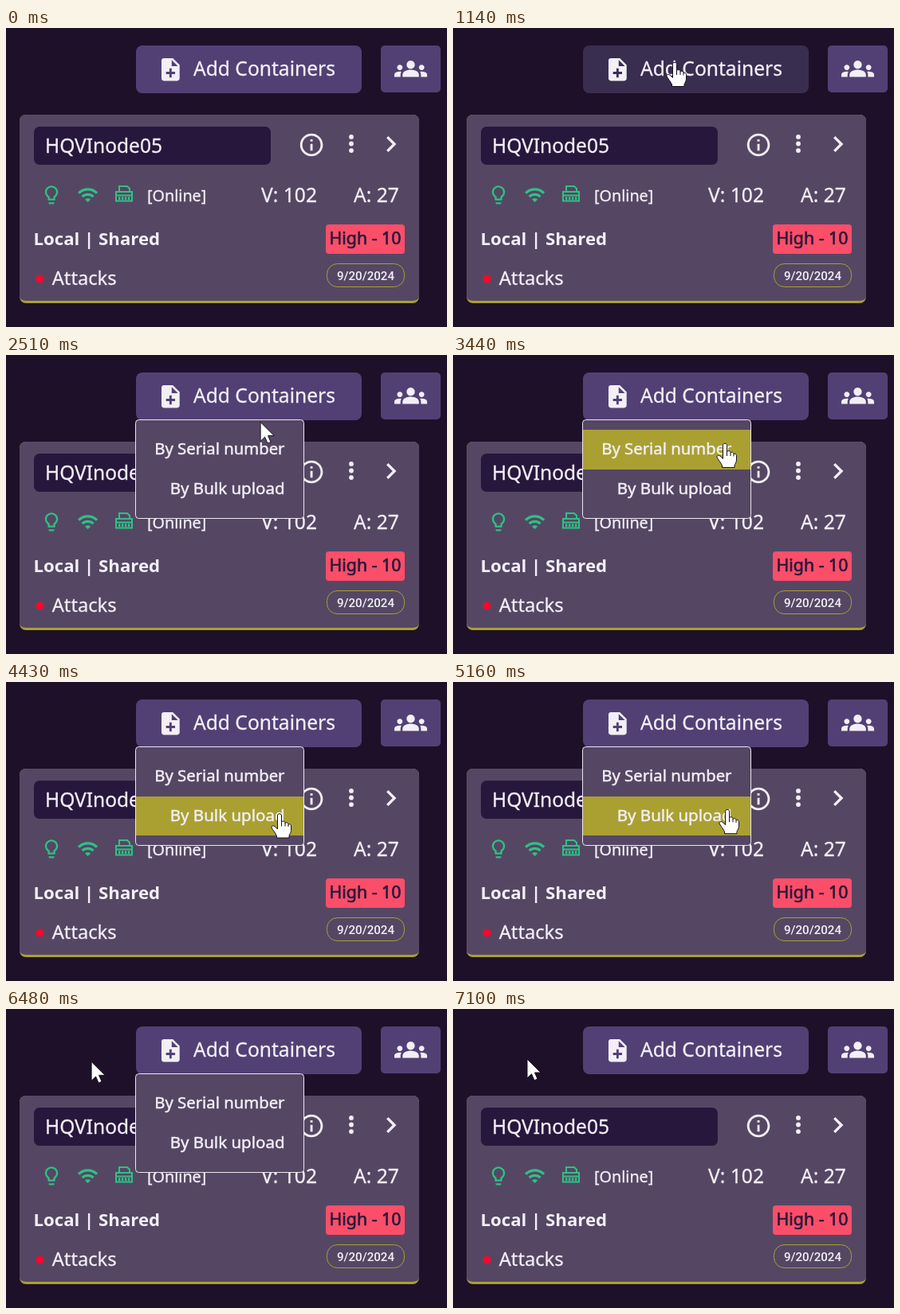
These frames come from a looping animation (553 px wide and 376 px high, 8.03 s). An HTML page:

```html
<!DOCTYPE html>
<html lang="en">
<head>
<meta charset="utf-8">
<title>Add Containers menu</title>
<style>
  html, body { margin: 0; width: 100%; height: 100%; overflow: hidden; background: #1f1029; }
  svg { display: block; width: 553px; height: 376px; font-family: "Noto Sans", "Open Sans", sans-serif; }
  text { fill: #f3eff6; stroke: #f3eff6; stroke-width: .3px; stroke-linejoin: round; white-space: pre; }
  .plain { stroke: none; }
  .dark { fill: #2a1a3c; stroke: #2a1a3c; stroke-width: .7px; }
  .medium { stroke-width: .45px; }
  .icon { fill: #f3eff6; }
  .green { fill: #2fc184; }
</style>
</head>
<body>
<svg viewBox="0 0 553 376">
  <rect width="553" height="376" fill="#1f1029"/>

  <rect id="button" x="163" y="22" width="283" height="60" rx="8"/>
  <path class="icon" transform="translate(189.3 35.2) scale(1.42)" d="M14 2H6c-1.1 0-1.99.9-1.99 2L4 20c0 1.1.89 2 1.99 2H18c1.1 0 2-.9 2-2V8l-6-6zm2 14h-3v3h-2v-3H8v-2h3v-3h2v3h3v2zm-3-7V3.5L18.5 9H13z"/>
  <text x="235" y="60" font-size="24.6">Add Containers</text>

  <rect x="470" y="22" width="75" height="59" rx="5" fill="#524075"/>
  <path class="icon" transform="translate(487 30.8) scale(1.71)" d="M12 12.75c1.63 0 3.07.39 4.24.9 1.08.48 1.76 1.56 1.76 2.73V18H6v-1.61c0-1.18.68-2.26 1.76-2.73 1.17-.52 2.61-.91 4.24-.91zM4 13c1.1 0 2-.9 2-2s-.9-2-2-2-2 .9-2 2 .9 2 2 2zm1.13 1.1c-.37-.06-.74-.1-1.13-.1-.99 0-1.93.21-2.78.58C.48 14.9 0 15.62 0 16.43V18h4.5v-1.61c0-.83.23-1.61.63-2.29zM20 13c1.1 0 2-.9 2-2s-.9-2-2-2-2 .9-2 2 .9 2 2 2zm4 3.43c0-.81-.48-1.53-1.22-1.85-.85-.37-1.79-.58-2.78-.58-.39 0-.76.04-1.13.1.4.68.63 1.46.63 2.29V18H24v-1.57zM12 6c1.66 0 3 1.34 3 3s-1.34 3-3 3-3-1.34-3-3 1.34-3 3-3z"/>

  <!-- card -->
  <rect x="17" y="109" width="501" height="237" rx="8" fill="#aaa032"/>
  <path d="M17 117a8 8 0 0 1 8-8H510a8 8 0 0 1 8 8V338a8 5 0 0 1-8 5H25a8 5 0 0 1-8-5z" fill="#554764"/>
  <rect x="35" y="124" width="297" height="48" rx="7" fill="#28173d"/>
  <text x="49" y="156.5" font-size="24.5">HQVInode05</text>
  <path class="icon" transform="translate(365.9 129.9) scale(1.43)" d="M11 7h2v2h-2zm0 4h2v6h-2zm1-9C6.48 2 2 6.48 2 12s4.48 10 10 10 10-4.48 10-10S17.52 2 12 2zm0 18c-4.41 0-8-3.59-8-8s3.59-8 8-8 8 3.59 8 8-3.59 8-8 8z"/>
  <g class="icon">
    <circle cx="433" cy="136.9" r="2.9"/>
    <circle cx="433" cy="145.5" r="2.9"/>
    <circle cx="433" cy="154.1" r="2.9"/>
  </g>
  <path class="icon" transform="translate(462.7 126) scale(1.67)" d="M10 6 8.59 7.41 13.17 12l-4.58 4.59L10 18l6-6z"/>

  <path class="green" transform="translate(43 195.8) scale(1.17)" d="M9 21c0 .55.45 1 1 1h4c.55 0 1-.45 1-1v-1H9v1zm3-19C8.14 2 5 5.14 5 9c0 2.38 1.19 4.47 3 5.74V17c0 .55.45 1 1 1h6c.55 0 1-.45 1-1v-2.26c1.81-1.27 3-3.36 3-5.74 0-3.86-3.14-7-7-7zm2.85 11.1-.85.6V16h-4v-2.3l-.85-.6C7.8 12.16 7 10.63 7 9c0-2.76 2.24-5 5-5s5 2.24 5 5c0 1.63-.8 3.16-2.15 4.1z"/>
  <path class="green" transform="translate(88.8 196.1) scale(1.15)" d="m1 9 2 2c4.97-4.97 13.03-4.97 18 0l2-2C16.93 2.93 7.08 2.93 1 9zm8 8 3 3 3-3c-1.65-1.66-4.34-1.66-6 0zm-4-4 2 2c2.76-2.76 7.24-2.76 10 0l2-2C15.14 9.14 8.87 9.14 5 13z"/>
  <g fill="none" stroke="#2fc184" stroke-width="2">
    <path d="M142 206V199H152L155 202V206M138 217.500V206H158V217.500zM138 210.500H158"/>
    <path d="M141 214.300H156" stroke-width="4" stroke-dasharray="2.300 1.700"/>
  </g>
  <text x="177" y="218" font-size="19.8">[Online]</text>
  <text x="320" y="219" font-size="24.6">V: 102</text>
  <text x="436" y="219" font-size="24.6">A: 27</text>

  <text class="plain" x="34.5" y="273" font-size="22.2" font-weight="700">Local | Shared</text>
  <rect x="401" y="247" width="99" height="37" rx="4" fill="#fb4e69"/>
  <text class="dark" x="450.5" y="272" font-size="21.3" text-anchor="middle">High - 10</text>
  <circle cx="42.5" cy="315.5" r="5" fill="#f8082c"/>
  <text x="57.7" y="322.5" font-size="23.7">Attacks</text>
  <rect x="402.5" y="296.5" width="97" height="29" rx="13" fill="none" stroke="#aaa032"/>
  <text class="plain" x="451" y="317" font-size="15.1" font-weight="500" text-anchor="middle" font-family="Roboto, sans-serif">9/20/2024</text>

  <g id="menu">
    <rect x="162.5" y="81.5" width="211" height="124" rx="4" fill="#554764"/>
    <rect id="item" x="163" width="210" height="49.6" fill="#aaa032" shape-rendering="crispEdges"/>
    <rect x="162.5" y="81.5" width="211" height="124" rx="4" fill="none" stroke="#ece7f0"/>
    <g text-anchor="end">
      <text class="medium" x="349.5" y="125" font-size="20.3">By Serial number</text>
      <text class="medium" x="349.5" y="174.7" font-size="20.5">By Bulk upload</text>
    </g>
  </g>

  <g id="cursor" fill="#fff" stroke="#15101a" stroke-linejoin="round">
    <path id="arrow" d="M0 0V24l5.500-5.300 3.500 8 4-1.700-3.500-8H17z"/>
    <g id="hand">
      <path d="M-2.500 2.500C-2.500-.5 2.500-.5 2.500 2.500V11c0-2 4.500-2 4.500 .5v1c.5-2 4-1.500 4 1v.5c.5-1.500 3.500-1 3.500 1.500V21c0 3-2 5-2.500 7v2.500H-3.500V28C-5 24.500-9 20-10 17.500C-10.500 15-7 14.500-5 17L-2.500 19.500z"/>
      <path d="M2.500 11v5M7 12.500V16M11 14v2.500" fill="none"/>
    </g>
  </g>
</svg>
<script>
const LOOP = 8030;
const el = id => document.getElementById(id);
const [button, menu, item, cursor, arrow, hand] =
  ["button", "menu", "item", "cursor", "arrow", "hand"].map(el);

// The screen refreshes only in bursts: [first, last, count]
const bursts = [
  [710, 1140, 7], [1550, 1730, 3], [1850, 1850, 1], [2250, 2700, 8],
  [3300, 3440, 3], [4230, 4500, 5], [5030, 5510, 8], [6140, 6550, 7], [6750, 7100, 6]
];

// Pointer travel: [start, end, x, y]
const moves = [
  [710, 1140, 278, 43], [2190, 2700, 338.5, 104], [3230, 3440, 341, 111],
  [4165, 4430, 343, 165.5], [4430, 4500, 344, 167], [4965, 5510, 344, 122], [6075, 6550, 93, 63]
];

const clamp = v => Math.min(1, Math.max(0, v));
const part = (t, a, b) => clamp((t - a) / (b - a));
const mix = (a, b, p) => a + (b - a) * p;
const smooth = p => p * p * (3 - 2 * p);

// cubic-bezier(.4, 0, .2, 1)
function ease(p) {
  let lo = 0, hi = 1;
  for (let i = 0; i < 18; i++) {
    const u = (lo + hi) / 2, v = 1 - u;
    if (1.2 * v * v * u + 0.6 * v * u * u + u * u * u < p) lo = u; else hi = u;
  }
  return lo * lo * (3 - 2 * lo);
}

function refresh(t) {
  let shown = 0;
  for (const [a, b, n] of bursts) {
    if (t < a) break;
    const step = n > 1 ? (b - a) / (n - 1) : 1;
    shown = Math.min(b, a + Math.floor((t - a + 4) / step) * step);
  }
  return shown;
}

function pointer(t) {
  let x = 139, y = 20;
  for (const [a, b, tx, ty] of moves) {
    const p = smooth(part(t, a, b));
    x = mix(x, tx, p);
    y = mix(y, ty, p);
  }
  return [x, y];
}

function draw(time) {
  const t = refresh(time);
  const [x, y] = pointer(t);

  const hover = ease(part(t, 780, 1060)) * (1 - ease(part(t, 1500, 1730)));
  const rgb = [[82, 57], [64, 46], [117, 80]].map(([a, b]) => Math.round(mix(a, b, hover)));
  button.setAttribute("fill", `rgb(${rgb})`);

  const closing = t >= 6700;
  const alpha = closing ? 1 - ease(part(t, 6700, 6980)) : ease(part(t, 1520, 1820));
  const grow = closing ? 1 - ease(part(t, 6790, 6980)) : ease(part(t, 1520, 1720));
  menu.setAttribute("opacity", alpha);
  menu.setAttribute("transform",
    `translate(163 82) scale(${mix(0.75, 1, grow)} ${mix(0.5625, 1, grow)}) translate(-163 -82)`);

  const onItem = t > 2000 && t < 6700 && x > 163 && x < 374 && y >= 94 && y < 194;
  item.setAttribute("y", y < 144 ? 94 : 143.6);
  item.setAttribute("visibility", onItem ? "visible" : "hidden");

  const onButton = t < 1600 && x > 163 && y > 22;
  const pointing = onItem || onButton;
  cursor.setAttribute("transform", `translate(${x} ${y})`);
  cursor.setAttribute("display", t < 710 ? "none" : "inline");
  hand.setAttribute("display", pointing ? "inline" : "none");
  arrow.setAttribute("display", pointing ? "none" : "inline");
}

const start = performance.now();
function tick() {
  draw((performance.now() - start) % LOOP);
  requestAnimationFrame(tick);
}
tick();
</script>
</body>
</html>
```
